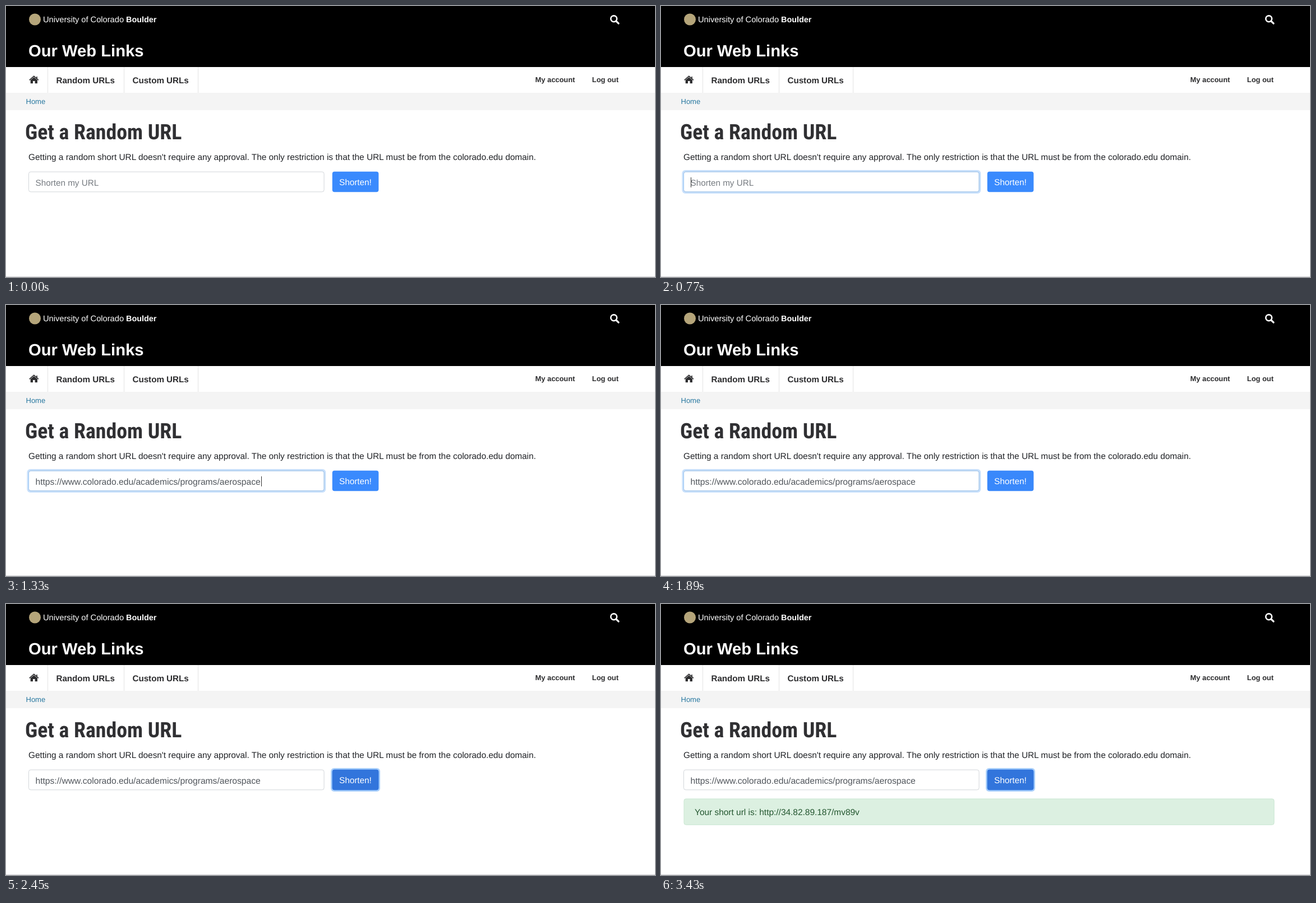
An HTML page that plays this animation: 1157x484 px, repeating every 3500 ms.

```html
<!DOCTYPE html>
<html lang="en">
<head>
<meta charset="utf-8">
<title>Short URL form</title>
<style>
  html, body { margin: 0; width: 100%; height: 100%; overflow: hidden; background: #fff; }
  svg { display: block; width: 100%; height: 100%; }
  text { font-family: "Liberation Sans", Arial, sans-serif; text-rendering: geometricPrecision; white-space: pre; }
  .bold { font-weight: 700; }
  .heading {
    font: 700 37.8px "Liberation Sans Narrow", "Roboto Condensed", "Open Sans Condensed", Roboto, sans-serif;
    font-stretch: 75%;
  }
</style>
</head>
<body>
<svg viewBox="0 0 1157 484">
  <rect width="1157" height="484" fill="#fff"/>
  <path d="M0 483.5H1157" stroke="#d2d3d6"/>

  <!-- Header -->
  <rect width="1157" height="109"/>
  <circle cx="51.5" cy="24" r="10.5" fill="#b5a57a"/>
  <g fill="#fff">
    <text x="66" y="29" font-size="14.65">University of Colorado</text>
    <text x="214" y="29" font-size="14.4" class="bold">Boulder</text>
    <text x="40" y="89.5" font-size="29.2" class="bold">Our Web Links</text>
  </g>
  <g fill="none" stroke="#fff" stroke-width="2.6">
    <circle cx="1083.6" cy="22.8" r="5.4"/>
    <path d="M1087.6 26.8L1092 31.2" stroke-width="3.2" stroke-linecap="round"/>
  </g>

  <!-- Navigation -->
  <g fill="#2c2c2e">
    <path d="M49.8 127.2L55.9 132.3V138.2H51.6V134H48V138.2H43.7V132.3Z"/>
    <path d="M41.7 132.3L49.8 125.4L57.9 132.3M55 126V129.6" fill="none" stroke="#2c2c2e" stroke-width="1.6"/>
    <g class="bold" font-size="15.15">
      <text x="89.5" y="138">Random URLs</text>
      <text x="225.5" y="138">Custom URLs</text>
    </g>
    <g class="bold" font-size="12.9">
      <text x="943.5" y="136">My account</text>
      <text x="1044.8" y="136">Log out</text>
    </g>
  </g>
  <path d="M74.5 109V155M210.5 109V155M342.5 109V155" stroke="#e4e4e4"/>
  <rect y="155" width="1157" height="31" fill="#f4f4f4"/>
  <text x="35.5" y="175" font-size="13" fill="#2878a0">Home</text>

  <!-- Form -->
  <text x="34" y="237.7" class="heading" fill="#303033">Get a Random URL</text>
  <text x="40" y="275.3" font-size="15.38" fill="#212327">Getting a random short URL doesn't require any approval. The only restriction is that the URL must be from the colorado.edu domain.</text>

  <rect id="inputGlow" x="37.4" y="293" width="532.8" height="42" rx="6" fill="#c8e0fb"/>
  <rect x="40.5" y="296.2" width="526.5" height="35.7" rx="3.6" fill="#fff" stroke="#d2d6da"/>
  <rect id="inputBorder" x="40.5" y="296.2" width="526.5" height="35.7" rx="3.6" fill="none" stroke="#98c4f3"/>
  <text id="placeholder" x="52.5" y="321" font-size="15.25" fill="#767b81">Shorten my URL</text>
  <text id="address" x="52.5" y="321" font-size="15.63" fill="#51565c">https://www.colorado.edu/academics/programs/aerospace</text>
  <path id="caret" stroke="#333" stroke-width="1"/>

  <rect id="buttonGlow" x="579" y="293" width="88" height="42" rx="6" fill="#a9cffa"/>
  <rect x="581.7" y="295.7" width="82.6" height="36.6" rx="4" fill="#3a8afd"/>
  <rect id="buttonDark" x="581.7" y="295.7" width="82.6" height="36.6" rx="4" fill="#3275dc"/>
  <text x="594" y="320" font-size="15.3" fill="#fff">Shorten!</text>

  <g id="alert">
    <rect x="41" y="348" width="1052" height="46.3" rx="3.6" fill="#dcf0e1" stroke="#c9e6d1"/>
    <text x="60" y="377" font-size="15.44" fill="#23562f">Your short url is: http://34.82.89.187/mv89v</text>
  </g>
</svg>
<script>
const LOOP = 3500, FADE = 150, BLINK = 500;
// Moments of the interaction, in ms
const FOCUS = 610, PASTE = 1190, HOVER = 1870, CLICK = 2020, REPLY = 2590;

const part = id => document.getElementById(id);
const [inputGlow, inputBorder, placeholder, address, caret, buttonGlow, buttonDark, alertBox] =
  ["inputGlow", "inputBorder", "placeholder", "address", "caret", "buttonGlow", "buttonDark", "alert"].map(part);

const fade = (t, start) => {
  const p = Math.min(1, Math.max(0, (t - start) / FADE));
  return p * p * (3 - 2 * p);
};
const opacity = (element, value) => element.setAttribute("opacity", +value);

function draw(t) {
  const pasted = t >= PASTE;
  const inputFocus = fade(t, FOCUS) - fade(t, CLICK);
  opacity(inputGlow, inputFocus);
  opacity(inputBorder, inputFocus);
  opacity(placeholder, !pasted);
  opacity(address, pasted);

  const blinkTime = t - (pasted ? PASTE : FOCUS + 20);
  const caretOn = t >= FOCUS + 20 && t < CLICK && blinkTime % (2 * BLINK) < BLINK;
  caret.setAttribute("d", `M${pasted ? 455.5 : 53.5} 306V324`);
  opacity(caret, caretOn);

  opacity(buttonDark, fade(t, HOVER));
  opacity(buttonGlow, fade(t, CLICK));
  opacity(alertBox, t >= REPLY);
}

function tick() {
  draw(performance.now() % LOOP);
  requestAnimationFrame(tick);
}
tick();
</script>
</body>
</html>
```
